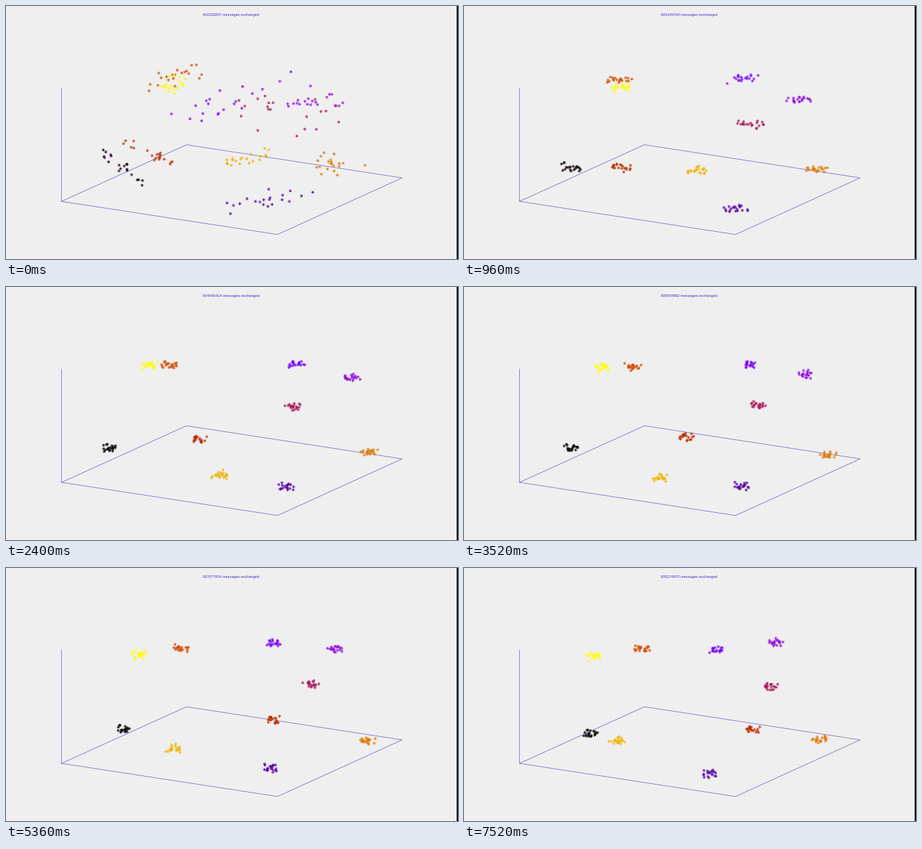
Recreate the animation shown at these times as a matplotlib script. Size 680x382 px, loop 7.6 s.

```python
import numpy as np
import matplotlib.pyplot as plt
from matplotlib.animation import FuncAnimation
from matplotlib.patches import Rectangle

W, H, DPI = 680, 382, 100
PX = 72 / DPI                      # one pixel in points
STEP, FRAMES = 40, 190
KEYS = (.96, 2.4, 5.36, 7.52)      # seconds at which a flock passes its points
NODES = 20
BATCH = 131071                     # messages per counter tick
rng = np.random.default_rng(11)


def palette(v):
    """Black, violet, red, orange, yellow for v from 0 to 1."""
    v = np.clip(v, 0, 1)
    rgb = np.stack([np.sqrt(v), v ** 3, np.sin(2 * np.pi * v)], axis=-1)
    return np.clip(rgb, 0, 1)


class Flock:
    """Nodes strewn along a line that gather around a drifting centre."""

    def __init__(self, a, b, fuzz, *points):
        self.drift = np.polyfit(KEYS, points, len(KEYS) - 1)
        along = rng.uniform(0, 1, (NODES, 1))
        self.start = np.array(a) + along * np.subtract(b, a)
        self.start += rng.normal(0, fuzz, (NODES, 2))
        k = (along[:, 0].argsort().argsort() + .5) / NODES
        turn = rng.permutation(NODES) * 2.4
        self.rest = np.c_[2 * k - 1, .8 * np.sin(turn)] * (9, 4.5)
        self.rest += rng.normal(0, 1.3, (NODES, 2))
        self.phase = rng.uniform(0, 2 * np.pi, (2, NODES, 2))
        self.rate = rng.uniform(1.5, 4.5, (2, NODES, 2))
        self.lag = rng.uniform(.33, .45, (NODES, 1))

    def at(self, t):
        s = max(t, KEYS[0])
        centre = sum(c * s ** p for p, c in enumerate(self.drift[::-1]))
        wave = np.sin(self.rate * t + self.phase).sum(axis=0) * (1.9, 1.1)
        wide = 1 + 1.4 * np.exp(-t / .9)
        home = centre + self.rest * (wide, 1) + wave
        return home + (self.start - home) * np.exp(-t / self.lag)


# Line ends, fuzz, then the points passed; in palette order.
flocks = [
    Flock((147, 222), (205, 268), 5,
          (160, 244), (156, 243), (177, 244), (190, 250)),
    Flock((333, 298), (450, 288), 6,
          (409, 307), (421, 302), (398, 302), (370, 310)),
    Flock((290, 157), (442, 97), 16,
          (430, 105), (438, 116), (403, 113), (381, 123)),
    Flock((427, 148), (510, 140), 4,
          (509, 141), (518, 137), (495, 122), (468, 112)),
    Flock((345, 160), (509, 163), 14,
          (433, 180), (433, 180), (459, 175), (460, 179)),
    Flock((176, 198), (258, 240), 6,
          (238, 245), (289, 230), (402, 229), (433, 243)),
    Flock((207, 122), (300, 93), 6,
          (231, 112), (246, 118), (263, 121), (268, 122)),
    Flock((460, 240), (532, 240), 12,
          (533, 247), (546, 249), (542, 261), (535, 259)),
    Flock((327, 239), (395, 223), 4,
          (350, 250), (323, 284), (253, 273), (231, 261)),
    Flock((226, 122), (270, 116), 5,
          (234, 122), (216, 117), (200, 130), (196, 132)),
]
value = np.repeat(np.linspace(0, 1, len(flocks)), NODES)
stray = rng.normal(0, .02, value.size)

fig = plt.figure(figsize=(W / DPI, H / DPI), dpi=DPI, facecolor="#efefef")
ax = fig.add_axes([0, 0, 1, 1])
ax.set(xlim=(0, W), ylim=(H, 0))
ax.axis("off")

# Floor of the box and its upright edge.
ax.plot([83.5, 83.5, 271.5, 596, 408.5, 83.5],
        [124, 295, 209.5, 259.5, 345, 295],
        color="#5652b8", alpha=.85, lw=.8 * PX)
ax.add_patch(Rectangle((678, 0), 2, H, fc="black", lw=0))
label = ax.text(296, 15.4, "", color="#3a34c4", family="Liberation Sans",
                size=5.63 * PX, va="baseline")
nodes = ax.scatter(np.zeros(value.size), np.zeros(value.size),
                   marker=(8, 2, 0), s=(4.6 * PX) ** 2, alpha=.85,
                   linewidths=.35 * PX, c=palette(value), zorder=3)


def draw(i):
    t = min(i, FRAMES - 2) * STEP / 1000
    nodes.set_offsets(np.vstack([f.at(t) for f in flocks]))
    nodes.set_color(palette(value + stray * np.exp(-t)))
    ticks = 17 + int(t / .143 + .47)
    label.set_text(f"{ticks * BATCH:09d} messages exchanged")
    return nodes, label


anim = FuncAnimation(fig, draw, frames=FRAMES, interval=STEP,
                     repeat=True, repeat_delay=0)
plt.show()
```
